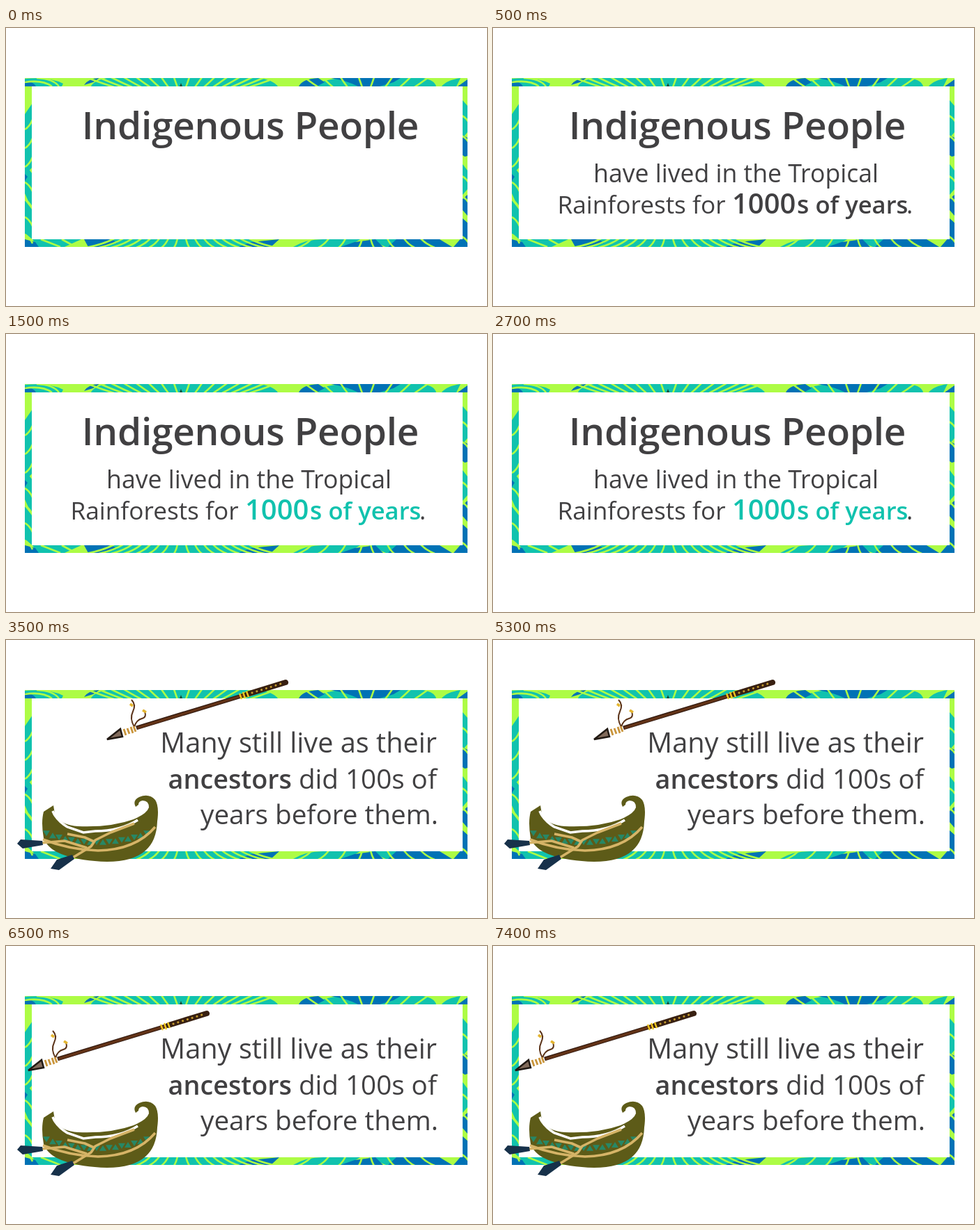
Animation, 690 px wide and 400 px high, one loop 8000 ms. Source, as an HTML page:

```html
<!DOCTYPE html>
<html lang="en">
<head>
<meta charset="utf-8">
<title>Indigenous People</title>
<style>
html, body { margin: 0; width: 100%; height: 100%; overflow: hidden; background: #fff; }
svg { display: block; width: 690px; height: 400px; }
text { font-family: "Open Sans", "Noto Sans", sans-serif; fill: #414042; }
.b { font-weight: 600; }
.teal { fill: #11c2ae; }
.blue { fill: #0072b5; }
.vein { fill: none; stroke: #adfc45; stroke-width: 2.6; }
.tan { fill: none; stroke: #d6b467; stroke-width: 3.6; stroke-linejoin: round; }
</style>
</head>
<body>
<svg viewBox="0 0 690 400">
  <clipPath id="frame"><path clip-rule="evenodd" d="M27 72H662V315H27ZM37 84V304H655V84Z"/></clipPath>
  <g clip-path="url(#frame)">
    <rect x="27" y="72" width="635" height="243" fill="#adfc45"/>
    <path class="teal" d="M27 84V73Q62 70 82 80L80 84Z
      M122 84Q125 76 145 72H362Q382 74 390 84Z M440 84Q452 75 480 72H598Q615 75 617 84Z M625 84Q632 75 652 72L646 84Z
      M27 124L38 108V200L27 212Z M27 196L38 210V262L27 238Z M27 248L38 262V304L27 296Z
      M38 304H108L84 315H45Z M150 304H352L385 315H128Z M412 315Q430 304 455 304H508L490 315Z M520 304H570L600 315H545Z
      M655 104L662 112V150L655 158Z M655 196L662 205V232L655 240Z"/>
    <path class="blue" d="M27 84V76Q38 76 43 84Z M112 82Q119 72 134 72L125 78Z
      M420 84Q425 73 448 72L457 78L446 84Z M466 72H566L556 78L536 84H505Q490 76 466 72Z M648 84L662 74V84Z
      M27 315V304L42 308L47 315Z M112 304H151L160 309L142 315H118Z M333 315L352 308L392 304L380 315Z
      M480 315L500 308L530 304L541 315Z M560 304H622L640 315H548Z M642 315L655 300V274L662 280V315Z
      M655 154L662 158V184L655 186Z M655 246L662 240V270L655 262Z M27 210L31 214L27 220Z"/>
    <path id="veins" class="vein"/>
    <path d="M249 84L251 79L253 84Z" fill="#174d35"/>
  </g>

  <g id="intro">
    <text class="b" x="350.5" y="160" font-size="55" text-anchor="middle" letter-spacing="-.3">Indigenous People</text>
    <g id="body">
      <text x="348.5" y="222" font-size="35.6" text-anchor="middle">have lived in the Tropical</text>
      <text x="92.5" y="267" font-size="35.2">Rainforests for</text>
      <text x="593" y="267" font-size="35">.</text>
      <g id="years">
        <text class="b" x="343" y="267" font-size="40">1000</text>
        <text class="b" x="436" y="267" font-size="35.5">s</text>
        <text class="b" x="462.5" y="267" font-size="34.6">of years</text>
      </g>
    </g>
  </g>

  <g id="outro">
    <g text-anchor="end" font-size="39.2">
      <text x="618" y="162" font-size="39.7">Many still live as their</text>
      <text class="b" x="410" y="214" font-size="37.8">ancestors</text>
      <text x="618" y="214" font-size="38.6">did 100s of</text>
      <text x="620" y="265" font-size="38.7">years before them.</text>
    </g>

    <g id="boat">
      <path fill="#5d5b18" d="M68 238L70 250Q77 266 103 268Q150 270 183 258Q202 250 205 241Q205 231 196 231
        Q190 232 190 237L186 240Q181 231 191 226Q205 220 214 230Q220 239 217 261Q216 289 200 303Q182 319 145 319
        Q108 318 85 310Q60 302 54 285Q50 262 54 247Z"/>
      <path fill="none" stroke="#fff" stroke-width="3.5" d="M67 246Q72 259 88 269L111 277L128 275Q164 275 189 259"/>
      <path id="teeth" fill="#278765"/>
      <path class="tan" stroke-width="3" d="M53 287Q92 302 132 303Q186 302 214 269"/>
      <path class="tan" d="M51 292L84 289L116 299M88 279L113 284L126 290M96 313L122 297L128 288L150 277L184 264"/>
      <path fill="#17314a" d="M16 293L21 287L52 289L53 295L24 300Z M64 329L73 316L95 309L98 315L76 331Z"/>
    </g>

    <g id="spear" fill="none">
      <path stroke="#5a3218" stroke-width="2" d="M184 125Q177 113 182 103T180 86M184 125Q187 115 195 113T198 101"/>
      <path stroke="#e4b52f" stroke-width="3.5" d="M178 92L182 95M196 101L201 104"/>
      <path fill="#826b5b" stroke="#211913" stroke-width="2.5" d="M145 143L164 128L167 139Z"/>
      <path stroke="#c9953c" stroke-width="2.8" d="M169 128L172 137M174 127L177 135M179 125L182 134M183 124L186 132"/>
      <path stroke="#30190f" stroke-width="6" d="M187 126.500L346 78"/>
      <path stroke="#633317" stroke-width="3.500" d="M188 126.500L346 78"/>
      <path stroke="#382011" stroke-width="8" stroke-linecap="round" d="M346 78L401 61"/>
      <path stroke="#edc51e" stroke-width="2.4" d="M335 77L338 85M340 75L343 84M345 74L348 82"/>
      <path stroke="#c49a2e" stroke-width="3" stroke-linecap="round" stroke-dasharray=".1 7" d="M353 76L399 61.500"/>
    </g>
  </g>
</svg>
<script>
const $ = id => document.getElementById(id);
const show = (id, on) => { $(id).style.display = on ? "" : "none"; };

// Leaf veins fan out from an axis along the top and bottom edges.
function fan(cx, count, gap, y, end) {
  let d = "";
  for (const side of [-1, 1]) {
    for (let i = 0; i < count; i++) {
      const x = 6 + i * gap, reach = 5 + i * 5;
      d += `M${cx + side * x} ${y}Q${cx + side * (x + reach * .4)} ${(y + end) / 2 + 2} ${cx + side * (x + reach)} ${end}`;
    }
  }
  return d;
}

function sideVeins(x, y0, y1, gap, rise) {
  let d = "";
  for (let y = y0; y < y1; y += gap) d += `M${x} ${y}q7 ${rise * .3} 11 ${rise}`;
  return d;
}

$("veins").setAttribute("d",
  fan(252, 8, 13, 85, 71) + fan(252, 8, 13, 303, 316) +
  fan(517, 4, 21, 85, 71) + fan(517, 4, 24, 303, 316) +
  "M27 78Q52 74 66 84M44 72Q68 73 76 84M50 304L78 315M80 304L100 315" +
  sideVeins(27, 146, 210, 27, -14) + sideVeins(27, 222, 302, 25, 13) +
  sideVeins(654, 126, 304, 29, 12));

// Alternating triangles along the hull.
let teeth = "";
for (let i = 0; i < 17; i++) {
  const x = 58 + i * 9, u = (x - 130) / 73, y = 291 - 13 * u * u, h = i % 2 ? 4 : -4;
  teeth += `M${x - 5} ${y + h}h10l-5 ${-2 * h}Z`;
}
$("teeth").setAttribute("d", teeth);

function draw(now) {
  const t = now % 8000;
  show("intro", t < 3500);
  show("body", t >= 500);
  show("outro", t >= 3500);
  for (const el of $("years").children) el.style.fill = t >= 1500 ? "#11c2ae" : "";
  $("spear").setAttribute("transform", t >= 6500 ? "translate(-113 36)" : "");
}

const start = performance.now();
function tick() {
  draw(performance.now() - start);
  requestAnimationFrame(tick);
}
tick();
</script>
</body>
</html>
```
